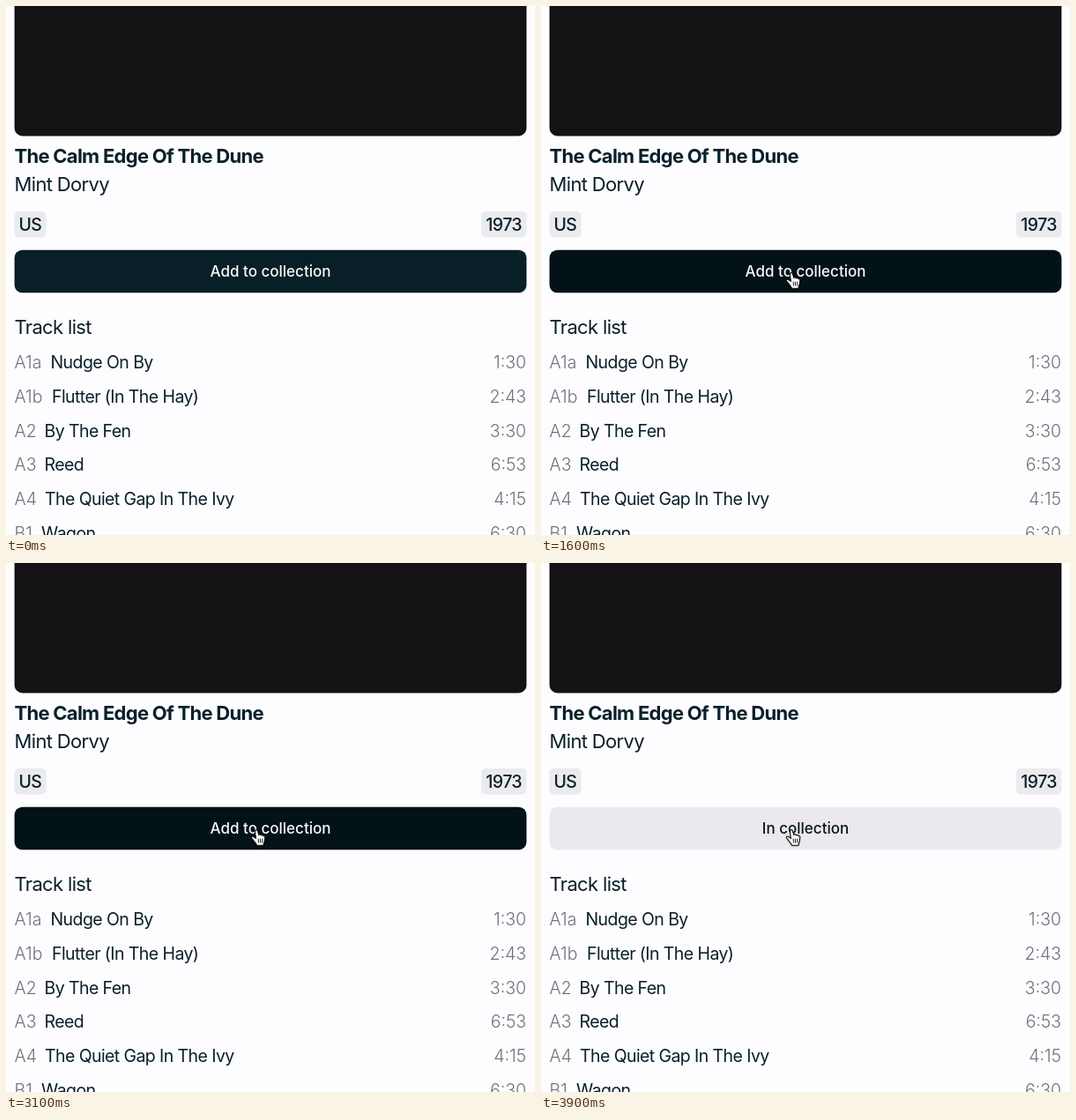
These frames come from a looping animation (600 px wide and 600 px high, 5 s). An HTML page with a canvas:

```html
<!DOCTYPE html>
<html lang="en">
<head>
<meta charset="utf-8">
<title>Album page</title>
<style>
  html, body { margin: 0; width: 100%; height: 100%; overflow: hidden; background: #fdfcfe; }
  canvas { display: block; width: 600px; height: 600px; }
</style>
</head>
<body>
<canvas id="stage" width="600" height="600"></canvas>
<script>
const ctx = document.getElementById('stage').getContext('2d');
const LOOP = 5000, STEP = 100;
const LEFT = 9.6, WIDTH = 580.8;
const INK = '#08202a', GREY = '#6c7478', CHIP = '#ebeaed';

// label, title, title x, length
const TRACKS = [
  ['A1a', 'Nudge On By', 50.5, '1:30'],
  ['A1b', 'Flutter (In The Hay)', 52, '2:43'],
  ['A2', 'By The Fen', 43.5, '3:30'],
  ['A3', 'Reed', 43.5, '6:53'],
  ['A4', 'The Quiet Gap In The Ivy', 44, '4:15'],
  ['B1', 'Wagon', 40, '6:30']
];

const clamp = v => Math.min(1, Math.max(0, v));
const mix = (a, b, k) => a + (b - a) * k;
const span = (t, from, to) => clamp((t - from) / (to - from));
const smooth = k => k * k * (3 - 2 * k);
const mixRgb = (a, b, k) => `rgb(${a.map((v, i) => Math.round(mix(v, b[i], k)))})`;

function text(str, x, y, size, { weight = 400, color = INK, align = 'left', track = -0.03 } = {}) {
  ctx.font = `${weight} ${size}px Inter, Lato, sans-serif`;
  ctx.letterSpacing = `${track * size}px`;
  ctx.textAlign = align;
  ctx.fillStyle = color;
  ctx.fillText(str, x, y);
}

function box(x, y, w, h, r, color) {
  ctx.fillStyle = color;
  ctx.beginPath();
  ctx.roundRect(x, y, w, h, r);
  ctx.fill();
}

function drawPage() {
  ctx.fillStyle = '#fdfcfe';
  ctx.fillRect(0, 0, 600, 600);
  box(LEFT, -20, WIDTH, 167.4, 9, '#141215');

  text('The Calm Edge Of The Dune', 9.5, 178, 22, { weight: 700, track: -0.033 });
  text('Mint Dorvy', 9.5, 210, 22);
  box(LEFT, 233, 36, 29.5, 5, CHIP);
  text('US', 14.5, 255, 19.5, { weight: 500 });
  box(539, 233, 51.4, 29.5, 5, CHIP);
  text('1973', 585, 255, 19.5, { weight: 500, align: 'right' });

  text('Track list', 9.5, 371.5, 22);
  TRACKS.forEach(([label, name, x, length], i) => {
    const y = 411 + i * 38.75;
    text(label, 9.5, y, 19.5, { weight: 300, color: GREY, track: 0 });
    text(name, x, y, 19.5);
    text(length, 590, y, 19.5, { weight: 300, color: GREY, align: 'right', track: 0 });
  });
}

function drawButton(t) {
  const added = t >= 3600;
  const hover = span(t, 1150, 1300);
  const press = smooth(span(t, 2200, 2700)) * (1 - smooth(span(t, 2800, 3100)));
  const scale = 1 - 0.0205 * press;
  const fill = added ? '#ebe9ed' : mixRgb([9, 31, 39], [2, 18, 23], hover);
  const color = added ? '#08161b' : mixRgb([250, 250, 251], [220, 221, 223], press);

  ctx.save();
  ctx.translate(300, 301);
  ctx.scale(scale, scale);
  box(-WIDTH / 2, -24.3, WIDTH, 48.6, 9, fill);
  text(added ? 'In collection' : 'Add to collection', 0, 6, 17,
    { weight: 500, color, align: 'center', track: 0 });
  ctx.restore();
}

function drawArrow(x, y) {
  const p = new Path2D('M0 0V15.5L3.4 12.3L5.6 17.8L8.1 16.7L5.8 11.4H10.4Z');
  ctx.save();
  ctx.translate(x, y);
  ctx.lineJoin = 'round';
  ctx.lineWidth = 2.2;
  ctx.strokeStyle = '#fff';
  ctx.shadowColor = 'rgba(0,0,0,.4)';
  ctx.shadowBlur = 3;
  ctx.shadowOffsetY = 1.5;
  ctx.stroke(p);
  ctx.shadowColor = 'transparent';
  ctx.fillStyle = '#050505';
  ctx.fill(p);
  ctx.restore();
}

function drawHand(x, y) {
  const hand = new Path2D(
    'M-1.6 1.6C-2 -.6 .8 -1 1.5 .9L2.7 5.4C3.5 4.3 5 4.6 5.3 5.8' +
    'C6.2 5 7.5 5.4 7.8 6.6C8.8 6.1 9.8 6.7 9.8 8L9.4 11.7' +
    'C9.2 13.5 8.2 14.5 8 17.2H.4C0 15 -2 13.8 -3.2 11.7' +
    'L-5.4 9C-6.4 7.5 -4.6 6.3 -3.2 7.5L-.6 9.4Z');
  const lines = new Path2D('M2.1 10L2.5 14M4.4 10L4.6 14M6.7 10V14');
  ctx.save();
  ctx.translate(x, y);
  ctx.lineJoin = ctx.lineCap = 'round';
  ctx.fillStyle = '#fff';
  ctx.strokeStyle = '#050505';
  ctx.shadowColor = 'rgba(0,0,0,.3)';
  ctx.shadowBlur = 2;
  ctx.shadowOffsetY = 1;
  ctx.fill(hand);
  ctx.shadowColor = 'transparent';
  ctx.lineWidth = 1.1;
  ctx.stroke(hand);
  ctx.lineWidth = 0.9;
  ctx.stroke(lines);
  ctx.restore();
}

function drawPointer(t) {
  if (t < 900) return;
  const k = smooth(span(t, 900, 1300));
  const x = mix(383, 284, k), y = mix(364, 303, k);
  (y < 325 ? drawHand : drawArrow)(x, y);
}

const start = performance.now();
function frame() {
  const now = Math.max(0, performance.now() - start) % LOOP;
  const t = Math.floor(now / STEP) * STEP;
  drawPage();
  drawButton(t);
  drawPointer(t);
  requestAnimationFrame(frame);
}
frame();
</script>
</body>
</html>
```
